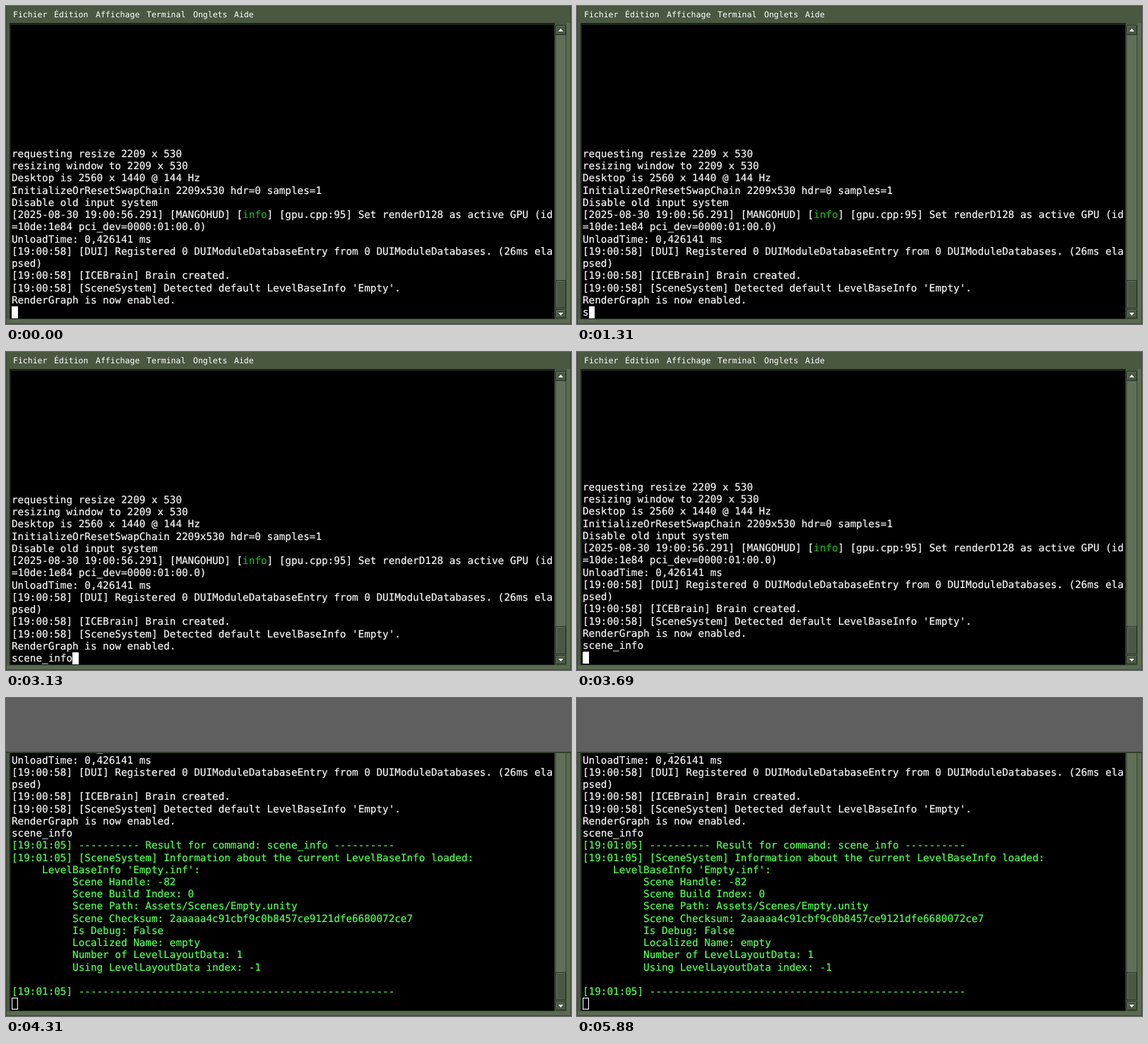
An HTML page for the animation above (5940 ms loop, 800 by 450 pixels).

```html
<!DOCTYPE html>
<html lang="fr">
<head>
<meta charset="utf-8">
<title>Terminal</title>
<style>
  html, body { margin: 0; width: 100%; height: 100%; overflow: hidden; }
  body { position: relative; background: #4a5842; text-rendering: geometricPrecision; }
  div, svg, pre, #menu span { position: absolute; margin: 0; }
  #menu span { top: 4px; font: 11.5px/16px "DejaVu Sans Mono", monospace; color: #fff; white-space: pre; }
  #edge { left: 5px; top: 24px; width: 772px; height: 419px; background: #1b2118; }
  #screen { left: 7px; top: 27px; width: 769px; height: 415px; background: #000; overflow: hidden; }
  /* The minute rotation lets baselines fall between whole pixels. */
  pre {
    left: 1px; bottom: -0.9px; transform: rotate(0.005deg);
    font: 14.3px/17.24px "DejaVu Sans Mono", monospace; color: #f6f6f6;
    -webkit-text-stroke: 0.2px;
  }
  .info { color: #18b218; }
  .out { color: #54ff54; }
  .cursor {
    display: inline-block; position: relative; top: -1.2px; vertical-align: top;
    width: 8.6px; height: 17.24px; background: #fff;
  }
  .hollow { background: none; box-shadow: inset 0 0 0 1.2px #eee; }
  #cover { left: 0; top: 0; width: 800px; height: 76px; background: #5f5f5f; border-bottom: 2px solid #33402c; }
</style>
</head>
<body>
<div id="menu"></div>
<div id="edge"></div>
<div id="screen"><pre id="log"></pre></div>
<svg width="800" height="450">
  <path d="M0 446.5H797V24" fill="none" stroke="#5b6b52" stroke-width="6"/>
  <path d="M0.5 0V450M0 449.5H800M799.5 0V450" fill="none" stroke="#3c4836"/>
  <path d="M778.5 26.5h14v416h-14z" fill="#5f7056" stroke="#465340"/>
  <g fill="#4a5842" stroke="#262e22">
    <path d="M778.5 27.5h14v13h-14zM778.5 388.5h14v39h-14zM778.5 429.5h14v12h-14z"/>
    <path d="M779.5 39.5v-11h12M779.5 426.5v-37h12M779.5 440.5v-10h12" fill="none" stroke="#66775c"/>
  </g>
  <path d="M782 36h7l-3.5-4zM782 434h7l-3.5 4z" fill="#fff"/>
</svg>
<div id="cover"></div>
<script>
const LOOP = 5940, ENTER = 3500, RESULT = 3750;
const command = 'scene_info';
const keyTimes = [1190, 1450, 1690, 1880, 2070, 2320, 2500, 2690, 2880, 3070];
const dashes = n => '-'.repeat(n);
const indent = ' '.repeat(10);

const boot = `requesting resize 2209 x 530
resizing window to 2209 x 530
Desktop is 2560 x 1440 @ 144 Hz
InitializeOrResetSwapChain 2209x530 hdr=0 samples=1
Disable old input system
[2025-08-30 19:00:56.291] [MANGOHUD] [<span class="info">info</span>] [gpu.cpp:95] Set renderD128 as active GPU (id
=10de:1e84 pci_dev=0000:01:00.0)
UnloadTime: 0,426141 ms
[19:00:58] [DUI] Registered 0 DUIModuleDatabaseEntry from 0 DUIModuleDatabases. (26ms ela
psed)
[19:00:58] [ICEBrain] Brain created.
[19:00:58] [SceneSystem] Detected default LevelBaseInfo 'Empty'.
RenderGraph is now enabled.
`;

const details = [
  'Scene Handle: -82',
  'Scene Build Index: 0',
  'Scene Path: Assets/Scenes/Empty.unity',
  'Scene Checksum: 2aaaaa4c91cbf9c0b8457ce9121dfe6680072ce7',
  'Is Debug: False',
  'Localized Name: empty',
  'Number of LevelLayoutData: 1',
  'Using LevelLayoutData index: -1'
].map(line => indent + line).join('\n');

const result = `<span class="out">[19:01:05] ${dashes(10)} Result for command: ${command} ${dashes(10)}
[19:01:05] [SceneSystem] Information about the current LevelBaseInfo loaded:
     LevelBaseInfo 'Empty.inf':
${details}

[19:01:05] ${dashes(52)}
</span>`;

const menu = { Fichier: 10, Édition: 68, Affichage: 127, Terminal: 199, Onglets: 265, Aide: 323 };
document.getElementById('menu').innerHTML = Object.entries(menu)
  .map(([label, x]) => `<span style="left:${x}px">${label}</span>`).join('');

const log = document.getElementById('log');
const cover = document.getElementById('cover');
let shown;

function draw() {
  const t = performance.now() % LOOP;
  const done = t >= RESULT;
  const typed = command.slice(0, keyTimes.filter(k => k <= t).length);
  const html = boot + typed + (t >= ENTER ? '\n' : '') + (done ? result : '') +
    `<span class="cursor${done ? ' hollow' : ''}"></span>`;
  if (html !== shown) {
    log.innerHTML = shown = html;
    cover.hidden = !done;
  }
  requestAnimationFrame(draw);
}
draw();
</script>
</body>
</html>
```
